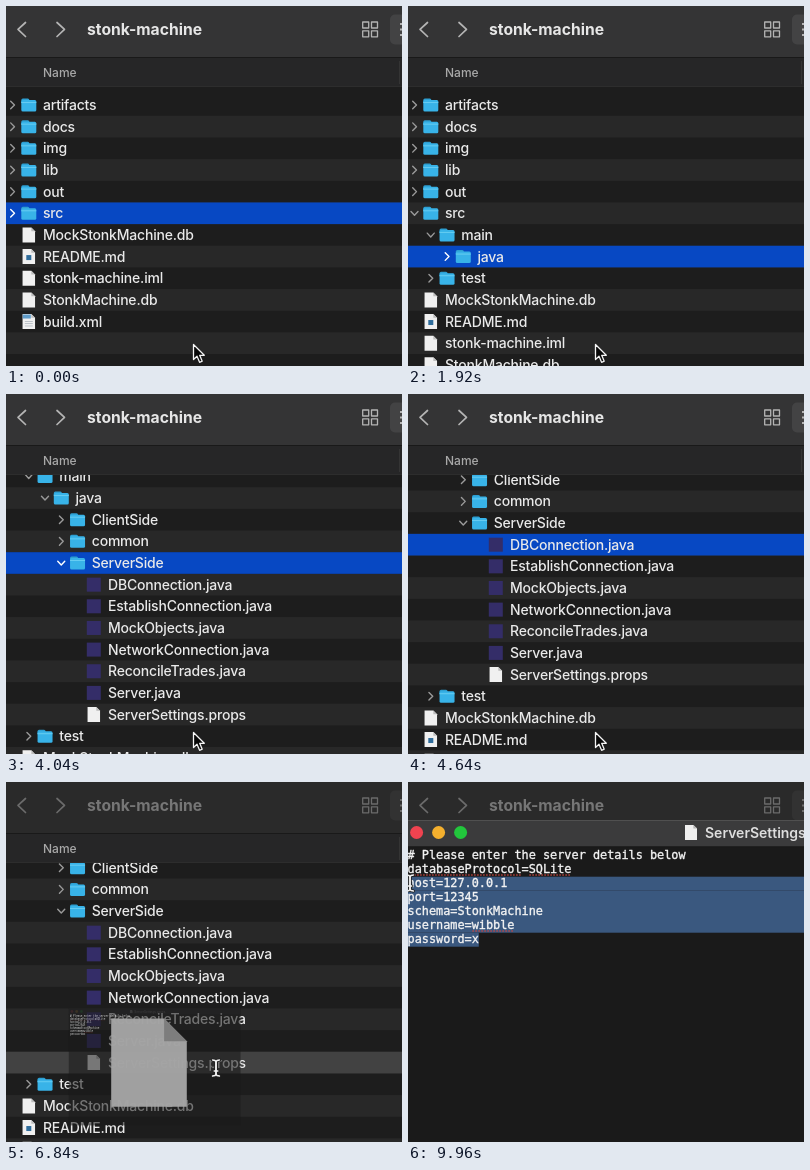
These frames come from a looping animation (396x360 px, 10000 ms). An HTML page with a canvas:

```html
<!DOCTYPE html>
<html lang="en">
<head>
<meta charset="utf-8">
<title>File browser</title>
<style>
html, body { margin: 0; width: 100%; height: 100%; overflow: hidden; background: #1e1e1e; }
canvas { display: block; width: 396px; height: 360px; }
</style>
</head>
<body>
<canvas id="stage"></canvas>
<script>
const W = 396, H = 360, LOOP = 10000;
const ROW = 21.65, LIST_TOP = 88.2, HEAD_BOTTOM = 81, INDENT = 16.25;
const UI = 'Inter, "Open Sans", sans-serif';
const MONO = '"DejaVu Sans Mono", monospace';
const canvas = document.getElementById('stage');
const ctx = canvas.getContext('2d');
const ratio = window.devicePixelRatio || 1;
canvas.width = W * ratio;
canvas.height = H * ratio;

const clamp = v => Math.max(0, Math.min(1, v));
const lerp = (a, b, p) => a + (b - a) * p;
const span = (t, start, length) => clamp((t - start) / length);
const easeInOut = p => p < 0.5 ? 2 * p * p : 1 - 2 * (1 - p) * (1 - p);

// Folders carry children and the time they open.
const folder = (name, opens = Infinity, kids = []) => ({ name, opens, kids, kind: 'folder' });
const file = (name, kind = 'page') => ({ name, kind, opens: Infinity, kids: [] });
const javaFiles = ['DBConnection', 'EstablishConnection', 'MockObjects',
  'NetworkConnection', 'ReconcileTrades', 'Server'].map(n => file(n + '.java', 'java'));
const tree = [
  folder('artifacts'), folder('docs'), folder('img'), folder('lib'), folder('out'),
  folder('src', 560, [
    folder('main', 1280, [
      folder('java', 2200, [
        folder('ClientSide'),
        folder('common'),
        folder('ServerSide', 3440, [...javaFiles, file('ServerSettings.props')])
      ])
    ]),
    folder('test')
  ]),
  file('MockStonkMachine.db'), file('README.md', 'readme'), file('stonk-machine.iml'),
  file('StonkMachine.db'), file('build.xml', 'xml')
];

const selections = [
  [0, 'src'], [1000, 'main'], [1720, 'java'], [2520, 'ClientSide'], [2840, 'common'],
  [3240, 'ServerSide'], [4320, 'DBConnection.java'], [4840, 'EstablishConnection.java'],
  [5000, 'MockObjects.java'], [5160, 'NetworkConnection.java'],
  [5320, 'ReconcileTrades.java'], [5480, 'Server.java'], [5640, 'ServerSettings.props']
];
const pointerPath = [
  [0, 187, 338], [5800, 187, 338], [6440, 210, 286], [7000, 210, 286],
  [7480, 130, 198], [7880, 72, 157], [8280, 72, 157], [9280, 2, 109], [9400, 2, 101]
];
const DIM_AT = 6640, OPEN_AT = 6680, OPEN_TIME = 360;

function pointerAt(t) {
  const i = pointerPath.findIndex(k => k[0] > t);
  if (i < 0) return pointerPath[pointerPath.length - 1].slice(1);
  const a = pointerPath[i - 1], b = pointerPath[i];
  const p = easeInOut((t - a[0]) / (b[0] - a[0]));
  return [lerp(a[1], b[1], p), lerp(a[2], b[2], p)];
}

function rect(x, y, w, h, color) {
  ctx.fillStyle = color;
  ctx.fillRect(x, y, w, h);
}

function roundRect(x, y, w, h, r, color) {
  ctx.beginPath();
  ctx.roundRect(x, y, w, h, r);
  ctx.fillStyle = color;
  ctx.fill();
}

function line(points, color, width) {
  ctx.beginPath();
  points.forEach(([x, y]) => ctx.lineTo(x, y));
  ctx.strokeStyle = color;
  ctx.lineWidth = width;
  ctx.lineCap = ctx.lineJoin = 'round';
  ctx.stroke();
}

function text(str, x, y, font, color, spacing = '0px') {
  ctx.font = font;
  ctx.letterSpacing = spacing;
  ctx.fillStyle = color;
  ctx.fillText(str, x, y);
}

function page(cx, cy, w, h, color, fold) {
  const x = cx - w / 2, y = cy - h / 2, f = w * 0.3;
  ctx.beginPath();
  ctx.moveTo(x, y);
  ctx.lineTo(x + w - f, y);
  ctx.lineTo(x + w, y + f);
  ctx.lineTo(x + w, y + h);
  ctx.lineTo(x, y + h);
  ctx.fillStyle = color;
  ctx.fill();
  ctx.beginPath();
  ctx.moveTo(x + w - f, y);
  ctx.lineTo(x + w - f, y + f);
  ctx.lineTo(x + w, y + f);
  ctx.fillStyle = fold;
  ctx.fill();
}

function icon(kind, cx, cy) {
  if (kind === 'folder') {
    roundRect(cx - 7.5, cy - 6.5, 8, 5, 1.5, '#2d9fd2');
    roundRect(cx - 7.5, cy - 5, 15, 11.5, 1.5, '#38b3e8');
    rect(cx - 7.5, cy - 3, 15, 1, '#66cdf2');
  } else if (kind === 'java') {
    rect(cx - 7, cy - 7, 14, 14, '#342d68');
  } else {
    page(cx, cy, 12.5, 15, '#f0f0f0', '#bdbdbd');
    if (kind === 'readme') rect(cx - 2.5, cy - 1.5, 5, 5, '#2f6d9c');
    if (kind === 'xml') {
      rect(cx - 6, cy - 7, 8, 4, '#5f9bc8');
      for (let i = 0; i < 3; i++) rect(cx - 4, cy - 0.5 + i * 2.3, 8, 0.7, '#a7b0b8');
    }
  }
}

function chevron(x, y, down, color) {
  line(down ? [[x - 3.5, y - 1.8], [x, y + 2], [x + 3.5, y - 1.8]]
            : [[x - 1.8, y - 3.8], [x + 2, y], [x - 1.8, y + 3.8]], color, 1.4);
}

function listRows(t) {
  const rows = [];
  let y = LIST_TOP;
  const walk = (nodes, depth, shown) => nodes.forEach(node => {
    rows.push({ node, depth, shown, y });
    y += ROW * shown;
    const open = easeInOut(span(t, node.opens, 160));
    if (open > 0) walk(node.kids, depth + 1, shown * open);
  });
  walk(tree, 0, 1);
  return rows;
}

function drawList(t, dim) {
  const scroll = 186.5 * easeInOut(span(t, 3702, 504));
  const selected = selections.filter(s => s[0] <= t).pop()[1];
  ctx.save();
  ctx.beginPath();
  ctx.rect(0, HEAD_BOTTOM, W, H - HEAD_BOTTOM);
  ctx.clip();
  rect(0, HEAD_BOTTOM, W, H, '#1d1d1d');
  ctx.translate(0, -scroll);
  for (let i = 1; i < 26; i += 2) rect(0, LIST_TOP + i * ROW, W, ROW, '#282828');
  for (const { node, depth, shown, y } of listRows(t)) {
    const active = node.name === selected;
    const mid = y + ROW / 2, x = depth * INDENT;
    if (active) rect(0, y, W, ROW, dim ? '#424242' : '#0748c3');
    ctx.globalAlpha = shown;
    if (node.kind === 'folder') {
      chevron(6.5 + x, mid, t >= node.opens, active && !dim ? '#ffffff' : '#9a9a9a');
    }
    icon(node.kind, 22.8 + x, mid);
    text(node.name, 37 + x, mid + 5, '500 14px ' + UI, '#e9e9e9', '-0.2px');
    ctx.globalAlpha = 1;
  }
  ctx.restore();
}

function drawToolbar(dim) {
  const ink = dim ? '#6b6b6b' : '#b4b4b4';
  rect(0, 0, W, 52, dim ? '#2a2a2a' : '#343435');
  line([[19.5, 16.5], [12, 23.3], [19.5, 30.5]], ink, 1.7);
  line([[51, 16.5], [58.5, 23.3], [51, 30.5]], ink, 1.7);
  text('stonk-machine', 81, 29, '700 15.7px ' + UI, dim ? '#767676' : '#e6e6e6');
  ctx.strokeStyle = ink;
  ctx.lineWidth = 1.3;
  for (const x of [356.7, 365.5]) {
    for (const y of [16, 24.8]) ctx.strokeRect(x, y, 6, 6);
  }
  roundRect(384, 8.5, 30, 30, 5, dim ? '#323232' : '#434344');
  for (let i = 0; i < 3; i++) rect(394, 17 + i * 5.5, 2, 2, ink);
  rect(0, 51, W, 1, '#191919');
  rect(0, 52, W, HEAD_BOTTOM - 52, '#262627');
  text('Name', 37, 70.5, '500 12px ' + UI, '#a9a9a9');
  rect(393, 55, 1, 23, '#343434');
  rect(0, HEAD_BOTTOM - 1, W, 1, '#2d2d2d');
}

const doc = ['# Please enter the server details below', 'databaseProtocol=SQLite',
  'host=127.0.0.1', 'port=12345', 'schema=StonkMachine', 'username=wibble', 'password=x'];
const CHAR = 7.13, LINE = 14, DOC_TOP = 66, LAST = doc.length - 1;
const WIN = { x: -6, y: 38, w: 795, h: 540 };

function drawSelection(t) {
  const endX = doc[LAST].length * CHAR - 0.5;
  const lineY = i => DOC_TOP + 0.7 + i * LINE;
  if (t < 8280) {
    if (t >= 8080) rect(endX, lineY(LAST), 1, LINE, '#e8e8e8');
    return;
  }
  const [px, py] = pointerAt(t);
  const first = Math.min(LAST, Math.floor((py - DOC_TOP) / LINE));
  const col = Math.min(doc[first].length, Math.round(px / CHAR));
  const startX = col * CHAR - 0.5;
  const color = '#3a587f';
  if (first === LAST) {
    rect(startX, lineY(LAST), endX - startX, LINE, color);
    return;
  }
  rect(startX, lineY(first), W - startX, LINE, color);
  rect(0, lineY(first + 1), W, (LAST - first - 1) * LINE, color);
  rect(0, lineY(LAST), endX, LINE, color);
}

function misspelt(row, from, count) {
  for (let x = from * CHAR; x < (from + count) * CHAR - 1; x += 3) {
    roundRect(x, DOC_TOP + row * LINE + 12.2, 1.8, 1.6, 0.8, '#c94540');
  }
}

function drawTitleBar() {
  rect(WIN.x, WIN.y, WIN.w, 27, '#3b3b3c');
  rect(WIN.x, WIN.y, WIN.w, 1, '#505050');
  rect(WIN.x, 64.3, WIN.w, 0.8, '#141414');
  ['#ef4350', '#f4b02e', '#22c63c'].forEach((color, i) =>
    roundRect(2.1 + i * 22, 44, 13, 13, 6.5, color));
  page(283, 50.5, 12, 15, '#efefef', '#b5b5b5');
  text('ServerSettings.props', 297, 55.5, '600 14px ' + UI, '#dedede');
}

function drawEditor(t, titleAlpha) {
  rect(WIN.x, WIN.y, WIN.w, WIN.h, '#1a1a1a');
  const alpha = ctx.globalAlpha;
  ctx.globalAlpha = alpha * titleAlpha;
  drawTitleBar();
  ctx.globalAlpha = alpha;
  drawSelection(t);
  ctx.strokeStyle = '#f4f4f4';
  ctx.lineWidth = 0.35;
  doc.forEach((str, i) => {
    const y = DOC_TOP + 11.2 + i * LINE;
    text(str, -0.5, y, '11.85px ' + MONO, '#f4f4f4');
    ctx.strokeText(str, -0.5, y);
  });
  misspelt(1, 0, 16);
  misspelt(1, 17, 6);
  misspelt(5, 9, 6);
}

function drawOpening(t) {
  const p = span(t, OPEN_AT, OPEN_TIME), grow = p * p;
  const scale = lerp(0.02, 1, grow);
  ctx.save();
  ctx.translate(lerp(80, WIN.x, grow), lerp(274, WIN.y, grow));
  ctx.scale(scale, scale);
  ctx.translate(-WIN.x, -WIN.y);
  ctx.globalAlpha = Math.min(1, 0.4 + grow * 0.8);
  drawEditor(t, grow);
  if (grow < 1) {
    ctx.globalAlpha = 1 - grow * grow;
    page(WIN.x + WIN.w * 0.467, WIN.y + WIN.h * 0.462, 350, 408, '#a6a6a6', '#7c7c7c');
  }
  ctx.restore();
}

function drawPointer(t) {
  const [x, y] = pointerAt(t);
  ctx.save();
  ctx.translate(x, y);
  if (t < DIM_AT) {
    ctx.beginPath();
    [[0.5, 0.5], [0.5, 15.5], [4, 12.3], [6.6, 18.3], [9.2, 17.2], [6.7, 11.3], [11.3, 11.3]]
      .forEach(([px, py]) => ctx.lineTo(px, py));
    ctx.closePath();
    ctx.fillStyle = '#080808';
    ctx.fill();
    ctx.strokeStyle = '#f5f5f5';
    ctx.lineWidth = 1.3;
    ctx.lineJoin = 'round';
    ctx.stroke();
  } else {
    for (const [color, width] of [['#202020', 3.2], ['#f2f2f2', 1.5]]) {
      for (const side of [-1, 1]) {
        line([[side * 3.4, -8], [side, -7.5], [0, -6.2], [0, 6.2], [side, 7.5], [side * 3.4, 8]],
          color, width);
      }
      line([[-1.8, 3], [1.8, 3]], color, width);
    }
  }
  ctx.restore();
}

function draw(t) {
  const dim = t >= DIM_AT;
  ctx.setTransform(ratio, 0, 0, ratio, 0, 0);
  drawList(t, dim);
  drawToolbar(dim);
  if (t >= OPEN_AT) drawOpening(t);
  drawPointer(t);
}

const begin = performance.now();
function tick() {
  draw((performance.now() - begin) % LOOP);
  requestAnimationFrame(tick);
}
tick();
</script>
</body>
</html>
```
